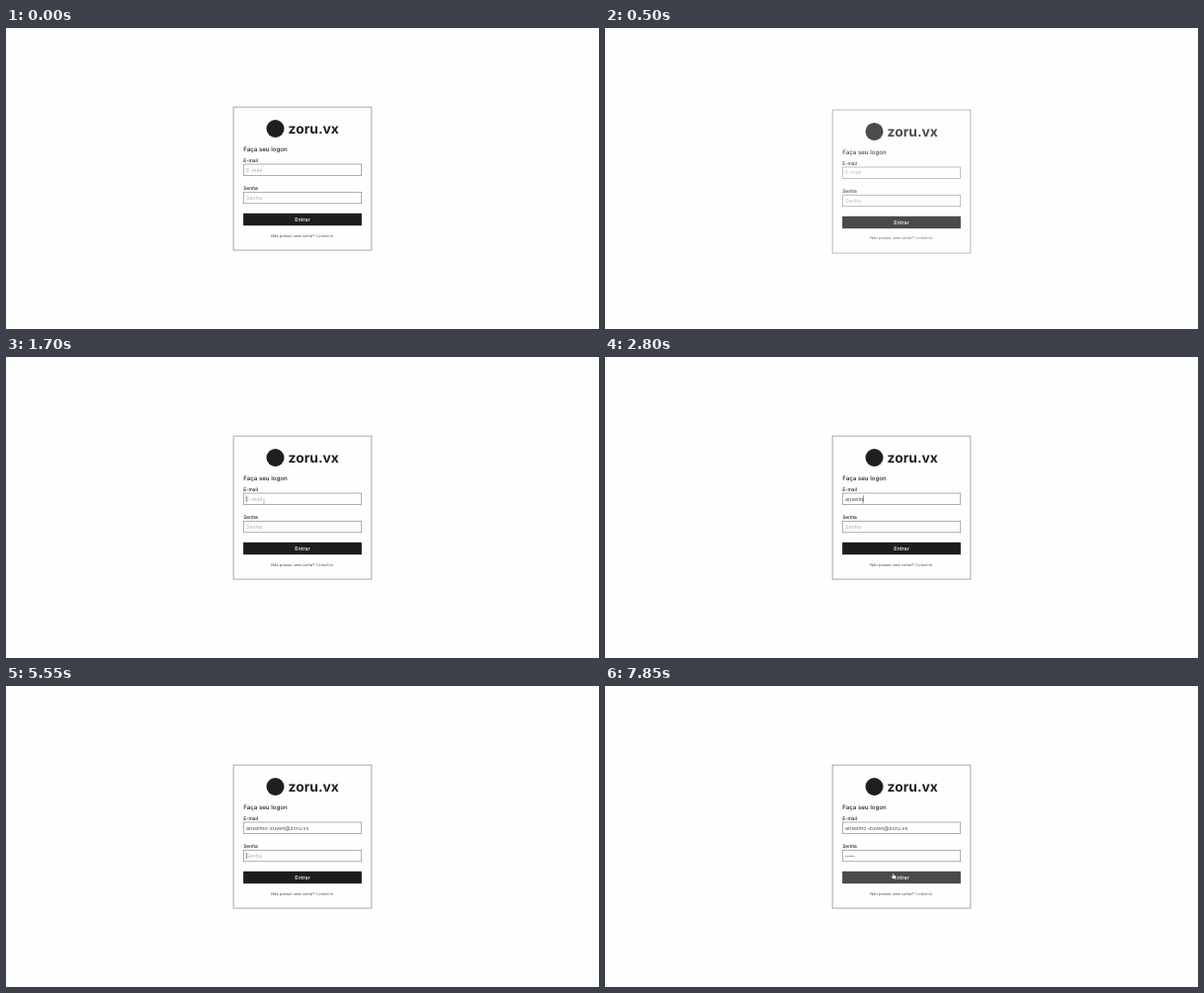
An HTML page that plays this animation: 600 px wide and 305 px high, repeating every 8000 ms.

```html
<!DOCTYPE html>
<html lang="pt-BR">
<head>
<meta charset="utf-8">
<title>Logon</title>
<style>
  html, body { margin: 0; width: 100%; height: 100%; overflow: hidden; background: #fefefe; }
  svg { display: block; width: 100vw; height: 100vh; }
  text {
    font-family: Inter, "Open Sans", sans-serif;
    font-size: 5.4px;
    fill: #1f1f20;
    text-rendering: geometricPrecision;
    white-space: pre;
  }
  .brand { font-size: 13.8px; font-weight: 700; }
  .title { font-size: 6.15px; font-weight: 500; }
  .label { font-size: 4.9px; font-weight: 500; }
  .hint { fill: #b0b0b0; }
  .value { fill: #505052; }
  .enter { fill: #fff; font-weight: 500; text-anchor: middle; }
  .foot { font-size: 3.97px; fill: #4a4a4c; text-anchor: middle; }
  .foot tspan { fill: #707072; }
  .box, .field { fill: none; stroke-width: .7; }
  .box { stroke: #848486; }
  .field { stroke: #8a8a8c; }
  #caret { stroke: #444; stroke-width: .6; }
</style>
</head>
<body>
<svg viewBox="0 0 600 305">
  <g id="card">
    <rect class="box" x="230.1" y="80.1" width="139.8" height="145"/>
    <circle cx="272.5" cy="102" r="9" fill="#1f1f20"/>
    <text class="brand" x="285.6" y="107.2">zoru.vx</text>
    <text class="title" x="240.2" y="124.7">Faça seu logon</text>

    <text class="label" x="240.2" y="135.6">E-mail</text>
    <rect class="field" x="240.3" y="138" width="119.4" height="11.5"/>
    <text class="hint" id="mailHint" x="243" y="145.5">E-mail</text>
    <text class="value" id="mail" x="243" y="145.5"></text>

    <text class="label" x="240.2" y="163.9">Senha</text>
    <rect class="field" x="240.3" y="166.3" width="119.4" height="11.5"/>
    <text class="hint" id="passHint" x="243" y="173.8">Senha</text>
    <g id="dots" fill="#505052"></g>

    <rect id="button" x="240.1" y="187.8" width="119.8" height="12.4" fill="#1d1d1f"/>
    <text class="enter" x="300" y="195.9">Entrar</text>
    <text class="foot" x="300" y="211.5">Não possui uma conta? <tspan>Cadastrar</tspan></text>
  </g>
  <path id="caret" d="M0 -3.2V3.2"/>
  <g id="pointer">
    <path id="arrow" d="M0 0V5.3L1.2 4.2L2 6L2.9 5.6L2.1 3.9H3.8Z" fill="#111" stroke="#fff" stroke-width=".35"/>
    <path id="beam" d="M-.9 -2.6Q0 -2.6 0 -2Q0 -2.6 .9 -2.6M0 -2V2M-.9 2.6Q0 2.6 0 2Q0 2.6 .9 2.6" fill="none" stroke="#777" stroke-width=".4"/>
    <path id="hand" d="M-.7 -1V2.2L-1.6 1.3Q-2.4 1.4 -2 2.2L-.4 4.6H2.3L3 2.6V1.3Q2.6 .7 2 1Q1.5 .4 .9 .8L.6 .6V-1Q0 -1.7 -.7 -1Z" fill="#fff" stroke="#111" stroke-width=".4"/>
  </g>
</svg>
<script>
const LOOP = 8000, STEP = 50;
const EMAIL = "anselmo-zuven@zoru.vx";

// [time, characters shown]
const mailSteps = [
  [2150, 1], [2250, 2], [2350, 3], [2500, 4], [2600, 5], [2750, 6], [2900, 7], [3100, 8],
  [3450, 9], [3600, 10], [3750, 11], [3850, 12], [4000, 13], [4300, 14],
  [4600, 16], [4750, 17], [4900, 18], [5000, 19], [5150, 20], [5300, 21]
];
const passSteps = [[6000, 1], [6200, 2], [6400, 3], [6600, 5], [6850, 6]];

// pointer trips: start, end of move, hidden again, from, to
const trips = [
  { on: 1300, stop: 1600, off: 3450, from: [172, 156.5], to: [261, 146.5] },
  { on: 7150, stop: 7650, off: LOOP, from: [264, 151.5], to: [291.5, 191] }
];

const $ = id => document.getElementById(id);
const show = (id, on) => $(id).style.display = on ? "" : "none";
const place = (id, x, y) => $(id).setAttribute("transform", `translate(${x} ${y})`);
const count = (steps, t) => steps.reduce((n, [at, c]) => t >= at ? c : n, 0);
const within = (v, lo, hi) => v >= lo && v <= hi;

for (let i = 0; i < 6; i++) {
  const dot = document.createElementNS("http://www.w3.org/2000/svg", "circle");
  dot.setAttribute("cx", 243.8 + i * 1.6);
  dot.setAttribute("cy", 172.2);
  dot.setAttribute("r", .55);
  $("dots").append(dot);
}

function paused(id, frames, duration) {
  const anim = $(id).animate(frames, { duration, easing: "ease", fill: "both" });
  anim.pause();
  return anim;
}
const enter = paused("card", [
  { opacity: 0, transform: "translateY(15px)" },
  { opacity: 1, transform: "translateY(0)" }
], 1000);
const hover = paused("button", [{ fill: "#1d1d1f" }, { fill: "#4a4a4c" }], 200);

function drawFields(t) {
  const typed = count(mailSteps, t), secret = count(passSteps, t);
  $("mail").textContent = EMAIL.slice(0, typed);
  show("mailHint", !typed);
  show("passHint", !secret);
  [...$("dots").children].forEach((dot, i) => dot.style.display = i < secret ? "" : "none");

  show("caret", t >= 1700 && t < 7350);
  if (t < 5550) place("caret", 243.2 + (typed ? $("mail").getComputedTextLength() : 0), 143.6);
  else place("caret", 243.2 + secret * 1.6, 171.9);
}

function drawPointer(t) {
  const trip = trips.find(p => t >= p.on && t < p.off);
  show("pointer", trip);
  if (!trip) return;
  const k = Math.min(1, (t - trip.on) / (trip.stop - trip.on));
  const e = k * k * (3 - 2 * k);
  const [x, y] = trip.from.map((v, i) => v + (trip.to[i] - v) * e);
  const inside = within(x, 240, 360);
  const text = inside && (within(y, 138, 150) || within(y, 166, 178));
  const press = inside && within(y, 188, 200.4);
  place("pointer", x, y);
  show("beam", text);
  show("hand", press);
  show("arrow", !text && !press);
}

function draw(t) {
  enter.currentTime = t < STEP ? 1000 : Math.min(t, 1000);
  hover.currentTime = Math.max(0, Math.min(200, t - 7600));
  drawFields(t);
  drawPointer(t);
}

const start = performance.now();
function tick() {
  const t = (performance.now() - start) % LOOP;
  draw(Math.floor(t / STEP) * STEP);
  requestAnimationFrame(tick);
}
tick();
</script>
</body>
</html>
```
